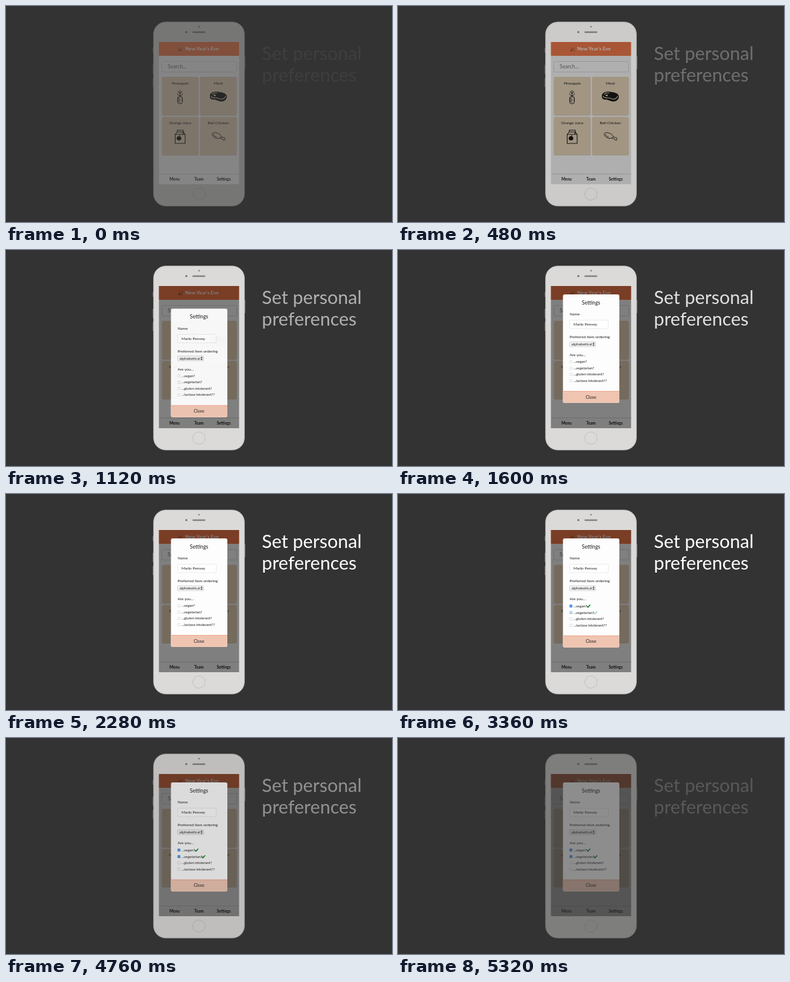
An HTML page that plays this animation: 640 by 360 pixels, repeating every 5.36 s.

```html
<!DOCTYPE html>
<html lang="en">
<head>
<meta charset="utf-8">
<title>Set personal preferences</title>
<style>
  html, body { margin: 0; width: 100%; height: 100%; overflow: hidden; background: #333; }
  svg { display: block; width: 100%; height: 100%; }
  text { font-family: Lato, "Open Sans", sans-serif; font-size: 6.5px; fill: #1c1c1c; }
  .mid { text-anchor: middle; }
  .bold { font-weight: 700; }
  .line { fill: none; stroke: #151515; stroke-linecap: round; stroke-linejoin: round; }
  #caption text { font-size: 30.5px; fill: #fff; }
</style>
</head>
<body>
<svg viewBox="0 0 640 360">
  <g id="phone">
    <path d="M244.300 70v8M244.300 98v15M244.300 120v15M395.800 83v22" stroke="#999" stroke-width="1.500"/>
    <rect x="244.700" y="26.700" width="150.600" height="306.600" rx="20" fill="#dbdad8" stroke="#b4b4b3"/>
    <circle cx="320" cy="34.500" r="1.200" fill="#777"/>
    <circle cx="299" cy="43.500" r="1.700" fill="#777"/>
    <rect x="309" y="42.300" width="21.500" height="2.600" rx="1.300" fill="#888"/>
    <circle cx="320" cy="313.500" r="10.200" fill="#dbdad8" stroke="#bdbcba" stroke-width=".9"/>

    <rect x="253.500" y="60" width="133" height="237" fill="#fff"/>
    <rect x="253.500" y="60" width="133" height="23" fill="#f57a4b"/>
    <g fill="none" stroke-width="1">
      <path d="M286 75l2-4 2 3zM290 71q2 0 3-2" stroke="#7a4a20"/>
      <path d="M286.500 68l1 1M291 74.500l2 .5" stroke="#4b7d3a"/>
    </g>
    <text x="297" y="74" class="bold" style="font-size:8.300px;fill:#fff">New Year's Eve</text>

    <rect x="258.500" y="92.500" width="124" height="17.500" rx="2" fill="#fff" stroke="#ddd"/>
    <text x="268" y="104" style="font-size:8.700px;fill:#777">Search...</text>

    <g id="tiles"></g>

    <g class="line" stroke-width=".9">
      <rect x="284.500" y="150.500" width="8" height="12.500" rx="3.500"/>
      <path d="M285 153l4 4M285 157l4 4M289 152l-4 4M289 156l-4 4M291.500 153v1M291.500 157v1"/>
      <path d="M288.500 150v-9.500M288.500 150q-4-1-4-4M288.500 150q4-1 4-4M288.500 146q-3-1-3-4M288.500 146q3-1 3-4"/>
    </g>
    <path d="M338 150c0-6 7-8 14-7 6 1 13 2 14 7 1 6-5 10-11 9-5-1-6-3-11-3-4 0-6-2-6-6z" fill="#151515"/>
    <path d="M340 150c1 4 6 3 9 3 5 1 8 4 12 1 2-1 3-2 3-4M341.500 147.500c2-3 6-3 9-2.500" fill="none" stroke="#ebd8bc" stroke-width="1.100"/>
    <ellipse cx="346" cy="149" rx="2" ry="1.200" fill="#ebd8bc"/>
    <g class="line" stroke-width="1.100">
      <path d="M280.500 214l3.500-4h10l3 4v15h-16.500zM280.500 214h16.500M284 210v-3h10v3M294 210l-1 4"/>
      <ellipse cx="286.800" cy="220.500" rx="3.300" ry="3" fill="#151515"/>
      <path d="M287 217.500l1.500-2"/>
    </g>
    <path class="line" stroke-width=".9" d="M354.500 220c-4 2-9 0-12-4-3-5 4-6 8-4 4 1 6 4 6.500 6l3 1.500c1.500-1.500 3 0 2 1.500 1.500 0 1.500 2.500 0 2.500-1 1-2.500 0-2.500-1.500l-5-2q1-1 2-2M344 214c0 2 3 4 5 4.500"/>

    <path d="M253.500 280h133" stroke="#d0d0d0" stroke-width=".8"/>
    <g class="mid bold">
      <text x="279.500" y="291">Menu</text>
      <text x="320" y="291">Team</text>
      <text x="361" y="291">Settings</text>
    </g>

    <rect id="dim" x="253.500" y="60" width="133" height="237" fill-opacity=".5"/>

    <g id="modal">
      <rect id="sheet" x="273.500" y="74" width="93.500" height="181" rx="3" fill="#fdfdfd"/>
      <text x="320" y="90.500" class="mid" style="font-size:8.700px">Settings</text>
      <text x="284.500" y="109.200">Name</text>
      <rect x="284.500" y="117" width="64" height="14" rx="1.500" fill="#fff" stroke="#e4e4e4" stroke-width=".8"/>
      <text x="291" y="126">Marlo Penvey</text>
      <text x="284.500" y="147">Preferred item ordering</text>
      <rect x="284.500" y="153" width="43" height="8" rx="1" fill="#f3f3f3" stroke="#bbb" stroke-width=".6"/>
      <text x="287.500" y="159">alphabetical</text>
      <path d="M322.700 156.300l1.600-2.300 1.600 2.300zM322.700 157.700l1.600 2.300 1.600-2.300z" fill="#222"/>
      <text x="284.500" y="177">Are you...</text>
      <g id="options"></g>
      <g id="footer">
        <path d="M273.500 235.500h93.500v16.500q0 3-3 3h-87.500q-3 0-3-3z" fill="#efc5b2"/>
        <path d="M273.500 235.500h93.500" stroke="#ee9470" stroke-width=".8"/>
        <text x="320" y="247.500" class="mid" style="font-size:7.200px">Close</text>
      </g>
    </g>
  </g>
  <g id="caption">
    <text x="424.300" y="90">Set personal</text>
    <text x="424.300" y="125.700">preferences</text>
  </g>
</svg>
<script>
const LOOP = 5360;
const $ = id => document.getElementById(id);
const ramp = (t, from, to) => Math.min(1, Math.max(0, (t - from) / (to - from)));
const fade = (el, value) => el.setAttribute('opacity', value);
const move = (el, y) => el.setAttribute('transform', `translate(0 ${y})`);

$('tiles').innerHTML = ['Pineapple', 'Meat', 'Orange Juice', 'Bell Chicken'].map((label, i) => {
  const x = 258.7 + (i % 2) * 63.2, y = 118 + (i >> 1) * 66.7;
  return `<rect x="${x}" y="${y + .6}" width="60.500" height="63.800" rx="2.500" fill="#cfc4b2"/>
    <rect x="${x}" y="${y}" width="60.500" height="63.800" rx="2.500" fill="#ebd8bc"/>
    <text x="${x + 30.2}" y="${y + 12.7}" class="mid">${label}</text>`;
}).join('');

// Ticked options carry the time they are ticked and the tick's x position.
const options = [
  { label: 'vegan', end: '?', start: 2600, stop: 2840, tickX: 313 },
  { label: 'vegetarian', end: '?', start: 3320, stop: 3440, tickX: 324.5 },
  { label: 'gluten intolerant', end: '?' },
  { label: 'lactose intolerant', end: '??' }
];
$('options').innerHTML = options.map(({ label, end, tickX }, i) => {
  const y = 186.3 + i * 10.55;
  const tick = tickX ? `<g class="tick">
      <rect x="284.500" y="${y - 2.2}" width="4.500" height="4.500" rx=".8" fill="#2f82e6"/>
      <path d="M285.600 ${y}l.9 1 1.500-2" fill="none" stroke="#fff" stroke-width=".7"/>
      <path d="M${tickX} ${y}l2 2 3.700-4.200" fill="none" stroke="#168322" stroke-width="1.700"/>
    </g>` : '';
  return `<g class="option">
    <rect x="284.700" y="${y - 2}" width="4.100" height="4.100" rx=".8" fill="#fff" stroke="#bbb" stroke-width=".5"/>
    <text x="291" y="${y + 1.9}" style="font-size:6px">...${label}${end}</text>${tick}</g>`;
}).join('');
const rows = [...document.querySelectorAll('.option')];
const ticks = [...document.querySelectorAll('.tick')];

function draw() {
  const t = performance.now() % LOOP;
  fade($('phone'), (.4 + .6 * ramp(t, 0, 560)) * (1 - .58 * ramp(t, 4520, LOOP)));
  fade($('caption'), ramp(t, -100, 1900) * (1 - ramp(t, 3680, 5680)));
  fade($('dim'), ramp(t, 300, 640));

  fade($('modal'), ramp(t, 880, 1130));
  move($('modal'), 66 * (1 - ramp(t, 880, 1480)) ** 2);

  // The first tick makes its row slightly taller and pushes the rest down.
  const grow = .8 * ramp(t, 2600, 2840);
  rows.forEach((row, i) => move(row, i ? grow : grow / 2));
  ticks.forEach((tick, i) => fade(tick, ramp(t, options[i].start, options[i].stop)));
  move($('footer'), grow);
  $('sheet').setAttribute('height', 181 + grow);
  requestAnimationFrame(draw);
}
draw();
</script>
</body>
</html>
```
